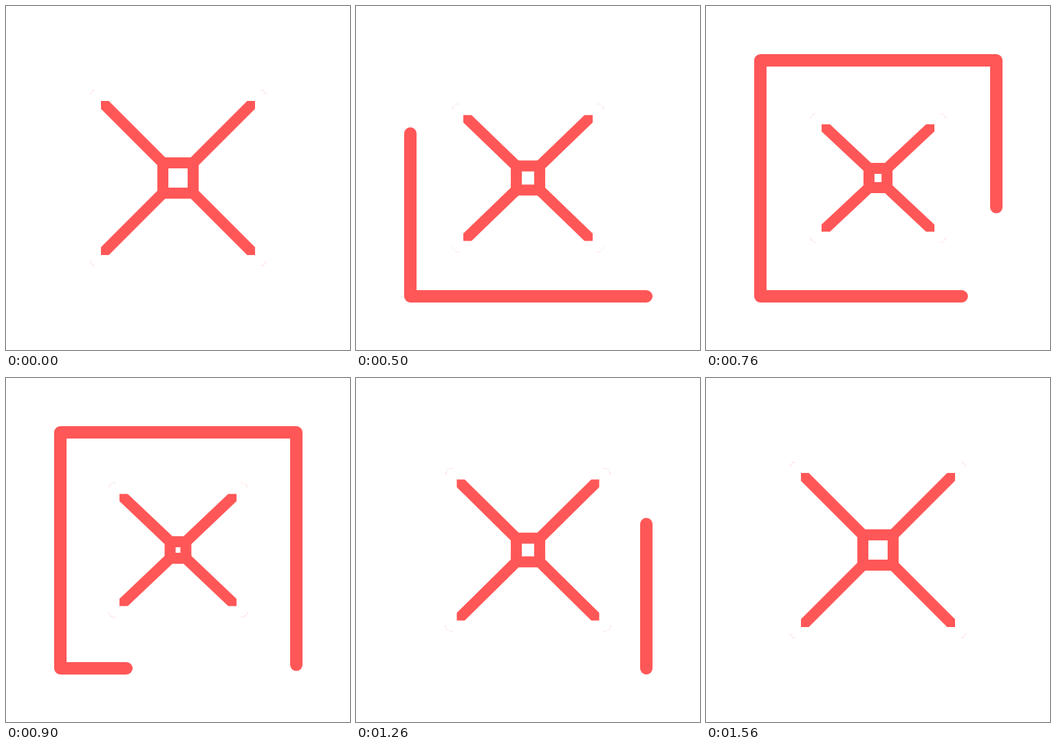
Recreate the animation shown at these times as an HTML page with a canvas. Size 500 by 500 pixels, loop 2000 ms.

```html
<!DOCTYPE html>
<html lang="en">
<head>
<meta charset="utf-8">
<title>Square loader</title>
<style>
html, body { margin: 0; width: 100%; height: 100%; overflow: hidden; background: #fff; }
canvas { display: block; width: 500px; height: 500px; }
</style>
</head>
<body>
<canvas id="stage" width="500" height="500"></canvas>
<script>
const ctx = document.getElementById('stage').getContext('2d');
const RED = '#ff5757', LOOP = 2000, STEP = 20, SIDE = 343;

// Half sizes of the two squares that carry the cross
const times = [160, 300, 500, 760, 1040, 1260, 1540];
const outerX = [120, 117, 102, 90, 99, 111.5, 120];
const outerY = [120, 116.5, 99.5, 86, 96.2, 110.5, 120];
const innerX = [22, 21, 17, 13.1, 10.6, 17, 22];
const innerY = [22, 21, 17.5, 14, 11, 17.2, 22];

const clamp = x => Math.min(1, Math.max(0, x));
const ease = x => x < 0.5 ? 2 * x * x : 1 - 2 * (1 - x) ** 2;
const progress = (t, from, to) => ease(clamp((t - from) / (to - from)));

// Monotone cubic interpolation, flat at both ends and at turning points
function sample(values, t) {
  const last = times.length - 1;
  if (t <= times[0]) return values[0];
  if (t >= times[last]) return values[last];
  const rate = i => (values[i + 1] - values[i]) / (times[i + 1] - times[i]);
  const slope = i => {
    if (i === 0 || i === last) return 0;
    const a = rate(i - 1), b = rate(i);
    return a * b > 0 ? 2 * a * b / (a + b) : 0;
  };
  const i = times.findIndex(x => x > t) - 1;
  const span = times[i + 1] - times[i], u = (t - times[i]) / span;
  const s = u * u * (3 - 2 * u);
  return values[i] * (1 - s) + values[i + 1] * s
    + span * u * (1 - u) * (slope(i) * (1 - u) - slope(i + 1) * u);
}

function square(halfX, halfY, color) {
  ctx.strokeStyle = color;
  ctx.strokeRect(250 - halfX, 250 - halfY, halfX * 2, halfY * 2);
}

function drawCross(t) {
  const ox = sample(outerX, t), oy = sample(outerY, t);
  const ix = sample(innerX, t), iy = sample(innerY, t);
  ctx.lineWidth = 16;
  square(ix, iy, RED);
  ctx.beginPath();
  for (const sx of [-1, 1]) for (const sy of [-1, 1]) {
    ctx.moveTo(250 + sx * ix, 250 + sy * iy);
    ctx.lineTo(250 + sx * ox, 250 + sy * oy);
  }
  ctx.stroke();
  square(ox, oy, '#fff');
}

// Point at a distance along the border, clockwise from the bottom right
function borderPoint(d) {
  const along = d % SIDE;
  return [
    [422 - along, 422], [79, 422 - along], [79 + along, 79], [422, 79 + along], [422, 422]
  ][Math.floor(d / SIDE)];
}

function drawBorder(t) {
  if (t < 120 || t >= 1495) return;
  const start = progress(t, 645, 1495) * SIDE * 4;
  const end = Math.max(0.01, progress(t, 130, 935) * SIDE * 4);
  ctx.lineWidth = 18;
  ctx.strokeStyle = RED;
  ctx.beginPath();
  ctx.moveTo(...borderPoint(start));
  for (let d = SIDE; d < end; d += SIDE) if (d > start) ctx.lineTo(...borderPoint(d));
  ctx.lineTo(...borderPoint(end));
  ctx.stroke();
}

function draw() {
  const t = Math.floor(performance.now() % LOOP / STEP) * STEP;
  ctx.fillStyle = '#fff';
  ctx.fillRect(0, 0, 500, 500);
  ctx.lineCap = ctx.lineJoin = 'round';
  drawCross(t);
  drawBorder(t);
  requestAnimationFrame(draw);
}
draw();
</script>
</body>
</html>
```
